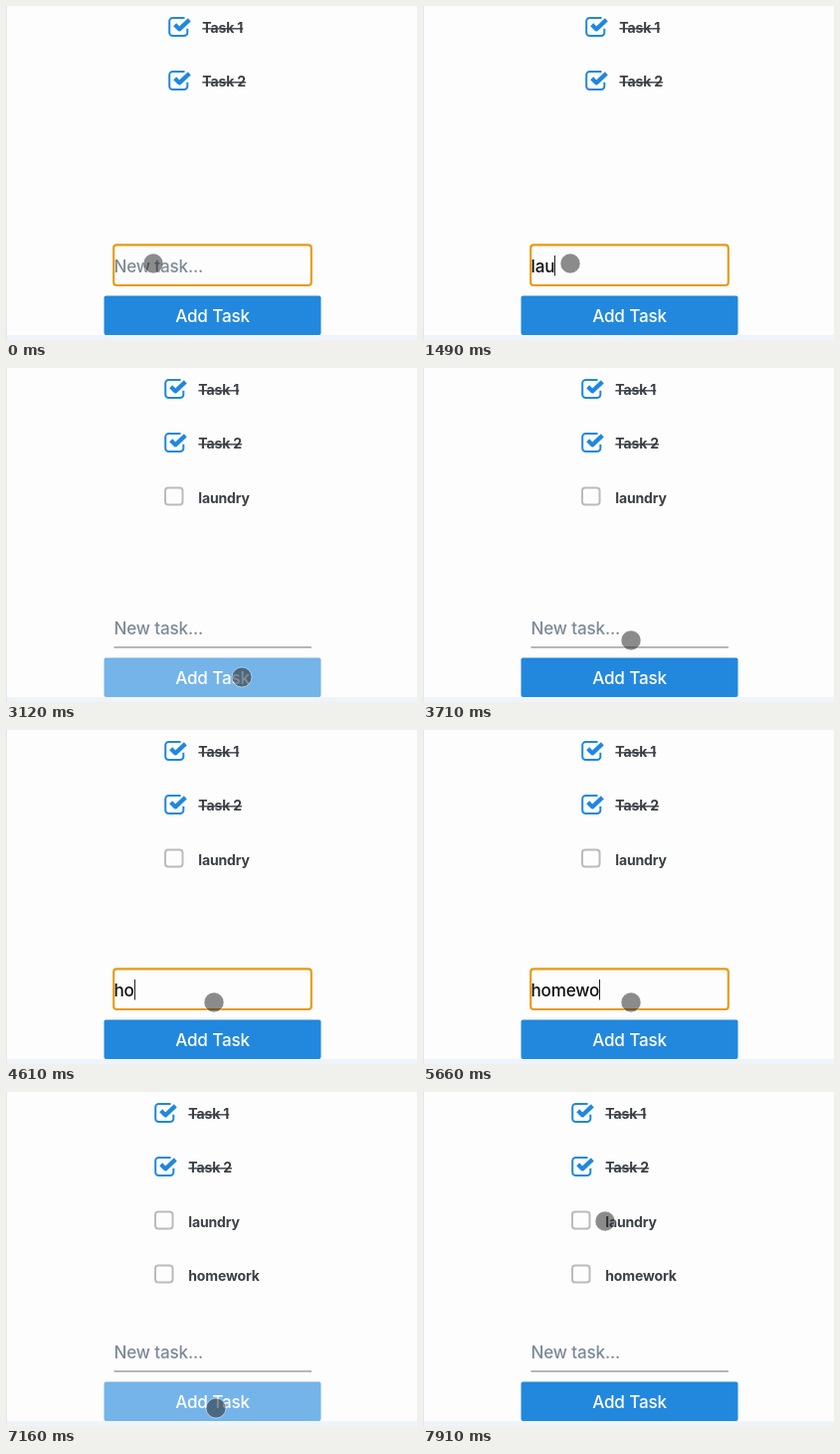
These frames come from a looping animation (413x336 px, 8 s). An HTML page:

```html
<!DOCTYPE html>
<html lang="en">
<head>
<meta charset="utf-8">
<title>Task list</title>
<style>
html, body { margin: 0; width: 100%; height: 100%; overflow: hidden; background: #fdfdfe; }
svg { display: block; }
text { font: 450 17.1px Inter, "Liberation Sans", sans-serif; letter-spacing: -.01em; white-space: pre; }
.task text { font-size: 14px; font-weight: 700; fill: #3b4046; }
.done text { text-decoration: line-through; }
.task path, .task rect { fill: none; stroke: #b9bbbd; stroke-width: 2; }
.done path { stroke: #1f88df; }
.done .tick { stroke-width: 4.2; stroke-linejoin: round; }
</style>
</head>
<body>
<svg width="413" height="336" viewBox="0 0 413 336">
  <rect y="331" width="413" height="5" fill="#eff4fb"/>
  <rect width="1" height="336" fill="#e3e6ec"/>
  <g id="list"></g>
  <path id="line" d="M108.5 281H307" stroke="#b5b7b9" stroke-width="2"/>
  <rect id="focus" x="108.2" y="240.4" width="198.6" height="40.6" rx="3" fill="none" stroke="#e79a10" stroke-width="2.1"/>
  <text id="field" x="108.5" y="267.7"></text>
  <rect id="caret" y="251" width="1" height="20.5" fill="#222"/>
  <g id="button">
    <rect x="98.5" y="291.5" width="218" height="39.5" rx="2" fill="#2188dd"/>
    <text x="207.5" y="318" text-anchor="middle" fill="#fff">Add Task</text>
  </g>
  <circle id="pointer" r="10" fill="#222" fill-opacity=".52" stroke="#fff" stroke-opacity=".5" stroke-width="1"/>
</svg>
<script>
const LOOP = 8000, TICK = 148.5;
const $ = id => document.getElementById(id);
const clamp = v => Math.min(1, Math.max(0, v));

const linear = u => u;
const easeOut = u => u * (2 - u);
const easeInOut = u => u < .5 ? 4 * u ** 3 : 1 - 4 * (1 - u) ** 3;

const done = ['Task 1', 'Task 2'];
const words = [
  { text: 'laundry', from: 4, to: 15, ease: easeOut, press: 20 },
  { text: 'homework', from: 30, to: 42, ease: linear, press: 47 }
];
const REFOCUS = 26;

const home = { x: 148, y: 259 };
const glides = [
  { from: 16, to: 20, x: 237, y: 311 },
  { from: 22, to: 25, x: 209, y: 274 },
  { from: 43, to: 46, x: 211, y: 318 },
  { from: 50, to: 53, x: 183, y: 130 }
];

const show = (id, on) => $(id).setAttribute('visibility', on ? 'visible' : 'hidden');
const submitted = (word, tick) => tick > word.press;

function typed(tick) {
  const word = words.find(w => !submitted(w, tick));
  if (!word) return '';
  const { text, from, to, ease } = word;
  return [...text].filter((_, i) =>
    tick >= from + Math.floor((to - from) * ease(i / (text.length - 1)))).join('');
}

function pointerAt(tick) {
  return glides.reduce((p, g) => {
    const k = easeInOut(clamp((tick - g.from) / (g.to - g.from)));
    return { x: p.x + (g.x - p.x) * k, y: p.y + (g.y - p.y) * k };
  }, home);
}

// The button fades while pressed and recovers after release
const fade = tick => Math.max(...words.map(w => clamp(1 - Math.abs(tick - w.press - 1) / 1.5)));

function taskRow(name, i) {
  const isDone = i < done.length;
  const box = isDone
    ? '<path d="M16.5 1H4.5a3.3 3.3 0 0 0-3.3 3.3v11.5a3.3 3.3 0 0 0 3.3 3.3h11.5a3.3 3.3 0 0 0 3.3-3.3v-4"/><path class="tick" d="M6.7 7.8L11.2 12.5L21.3 3"/>'
    : '<rect x="1" y="1" width="17.5" height="17" rx="3"/>';
  const y = 54 * i + (isDone ? 10.9 : 11.5);
  return `<g class="task ${isDone ? 'done' : ''}" transform="translate(0 ${y})">${box}<text x="34.3" y="${isDone ? 16.6 : 16}">${name}</text></g>`;
}

// Rows are centred as a block, so the widest label sets the left edge
let shownCount = 0;
function drawList(tick) {
  const names = [...done, ...words.filter(w => submitted(w, tick)).map(w => w.text)];
  if (names.length === shownCount) return;
  shownCount = names.length;
  const list = $('list');
  list.innerHTML = names.map(taskRow).join('');
  const widths = [...list.querySelectorAll('text')].map(t => t.getComputedTextLength());
  const left = Math.round(184.5 - Math.max(...widths) / 2);
  list.setAttribute('transform', `translate(${left} 0)`);
}

function draw(ms) {
  const tick = Math.floor((ms + 3) / TICK);
  drawList(tick);

  const [first, second] = words;
  const focused = tick < first.press || (tick >= REFOCUS && tick < second.press);
  show('focus', focused);
  show('line', !focused);

  const value = typed(tick), field = $('field');
  field.textContent = value || 'New task...';
  field.setAttribute('fill', value ? '#111' : '#7d8a95');
  show('caret', focused && value);
  $('caret').setAttribute('x', Math.round(108.5 + field.getComputedTextLength()));

  $('button').setAttribute('opacity', 1 - .38 * fade(tick));
  const { x, y } = pointerAt(tick);
  $('pointer').setAttribute('transform', `translate(${x} ${y})`);
}

const start = performance.now();
function run() {
  draw((performance.now() - start) % LOOP);
  requestAnimationFrame(run);
}
run();
</script>
</body>
</html>
```
